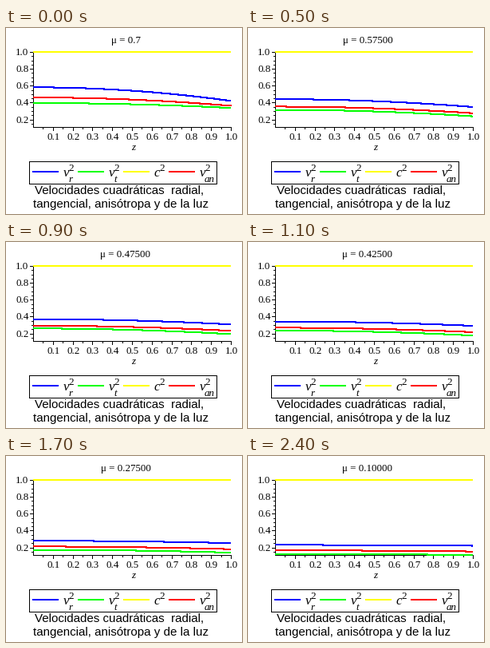
Write a matplotlib script that moves like this. It is 296x233 px and loops after 2.5 s.

```python
import numpy as np
import matplotlib.pyplot as plt
from matplotlib.animation import FuncAnimation
from matplotlib.patches import Rectangle

W, H, DPI = 296, 233, 100
FRAMES, INTERVAL = 25, 100
X0, X1, AXIS_Y = 34, 282, 124
BLUE, GREEN, YELLOW, RED = "#0000ff", "#00ff00", "#ffff00", "#ff0000"
SERIF, SANS = "Liberation Serif", "Liberation Sans"

fig = plt.figure(figsize=(W / DPI, H / DPI), dpi=DPI, facecolor="white")
ax = fig.add_axes([0, 0, 1, 1])
ax.set(xlim=(0, W), ylim=(H, 0))
ax.axis("off")


def pt(px):
    return px * 72 / DPI


def label(x, y, s, size=13, font=SERIF, ha="left", style="normal"):
    return ax.text(x, y, s, fontsize=pt(size), family=font, ha=ha,
                   va="baseline", style=style)


def stroke(x, y, color="black", width=1, **kwargs):
    return ax.plot(x, y, color=color, lw=pt(width), antialiased=False,
                   solid_capstyle="butt", **kwargs)[0]


def to_x(z):
    return X0 + (X1 - X0) * z


def to_y(v):
    return 135.8 - 105.8 * v


def draw_axes():
    stroke([X0, X1], [AXIS_Y, AXIS_Y])
    stroke([X0, X0], [30, AXIS_Y])
    for k in range(1, 21):
        x = round(to_x(k / 20))
        stroke([x, x], [AXIS_Y, AXIS_Y + (2 if k % 2 else 4)])
        if k % 2 == 0:
            label(x + 0.5, 140, f"{k / 20:.1f}", ha="center")
    for k in range(3, 21):
        y = round(to_y(k / 20))
        stroke([X0 - (4 if k % 4 == 0 else 2), X0], [y, y])
        if k % 4 == 0:
            label(28.5, y + 4, f"{k / 20:.1f}", ha="right")
    label(159.5, 153, "z", ha="center", style="italic")


def draw_legend():
    ax.add_patch(Rectangle((29, 167), 235, 28, fill=False, lw=pt(1),
                           antialiased=False))
    entries = [(BLUE, "v", "r"), (GREEN, "v", "t"),
               (YELLOW, "c", ""), (RED, "v", "an")]
    for i, (color, name, sub) in enumerate(entries):
        x = 33 + 57 * i
        stroke([x, x + 33], [180, 180], color, 2)
        label(x + 38.5, 186, name, 17, style="italic")
        label(x + 45.5, 179, "2")
        label(x + 45, 193, sub, style="italic")


def draw_caption():
    label(35.5, 208, "Velocidades cuadráticas  radial,", 15.1, SANS)
    label(34.5, 225, "tangencial, anisótropa y de la luz", 15.1, SANS)


# Each pair gives the squared speed at z = 0 and at z = 1.
def radial(m):
    return 1 / (4.78 - 4.37 * m), 1 / (4.85 - 3 * m - 0.75 * m**2)


def tangential(m):
    return 0.104 + 0.1405 * m + 0.393 * m**2, 1 / (9.9 - 9.9 * m)


def anisotropic(m):
    return (1 / (6.83 - 8.3 * m + 2.35 * m**2),
            1 / (7.05 - 5 * m - 1.6 * m**2))


def light(m):
    return 1, 1


draw_axes()
draw_legend()
draw_caption()

# One sample per pixel column, drawn as steps of whole pixels.
z = np.linspace(0, 1, X1 - X0 + 1)
curves = [(speed, stroke(to_x(z), 0 * z, color, 2, drawstyle="steps-post"))
          for speed, color in [(radial, BLUE), (tangential, GREEN),
                               (light, YELLOW), (anisotropic, RED)]]
title = label(150, 19, "", ha="center")


def update(i):
    m = 0.7 - 0.025 * i
    for speed, line in curves:
        start, end = speed(m)
        line.set_ydata(np.round(to_y(start + (end - start) * z**2)))
    title.set_text(f"μ = {m:.5f}" if i else "μ = 0.7")
    return [line for _, line in curves] + [title]


anim = FuncAnimation(fig, update, frames=FRAMES, interval=INTERVAL,
                     repeat=True, repeat_delay=0, blit=False)
plt.show()
```
